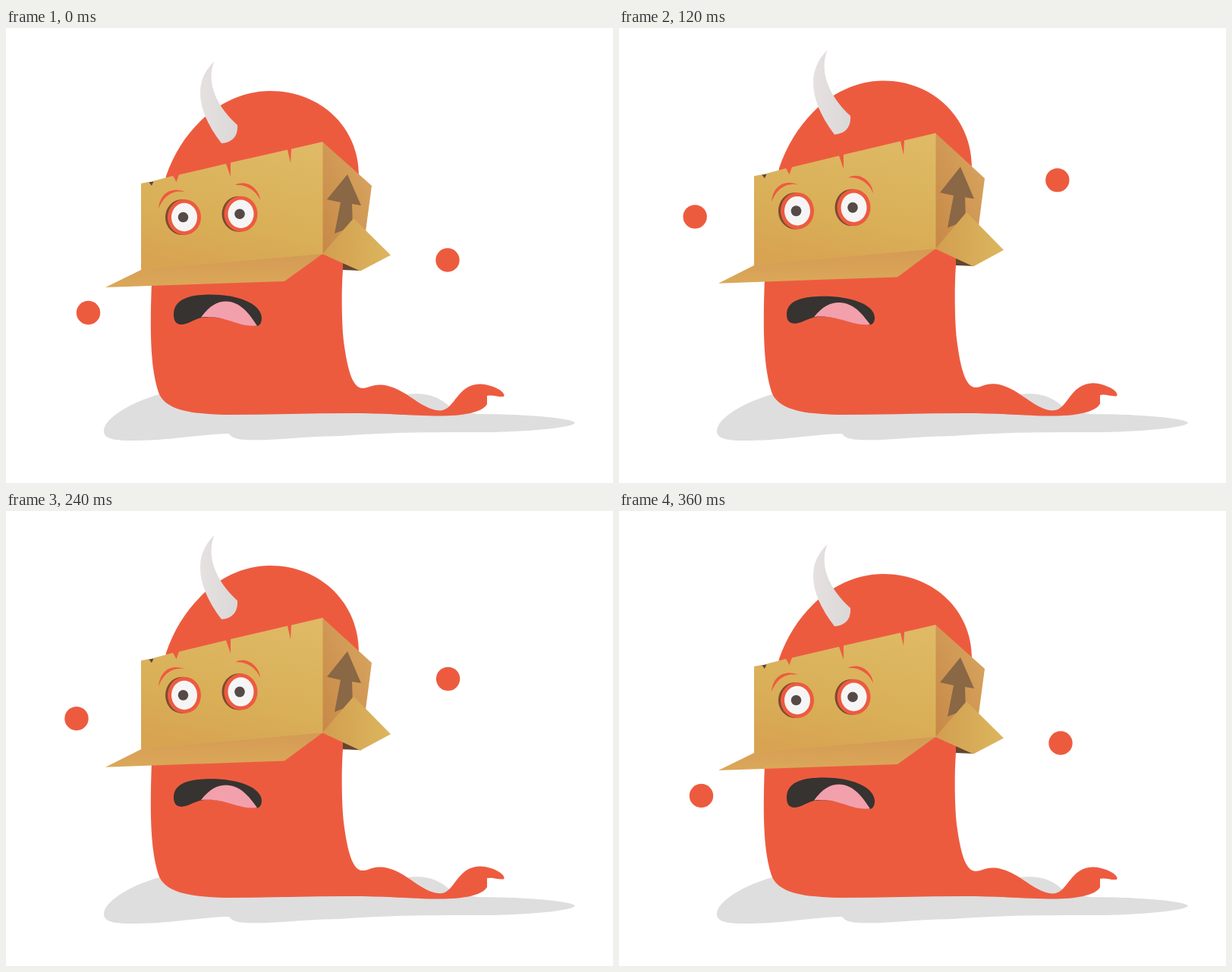
These frames come from a looping animation (800 px wide and 600 px high, 0.4 s). An HTML page:

```html
<!DOCTYPE html>
<html lang="en">
<head>
<meta charset="utf-8">
<title>Jumpy monster in a box</title>
<style>
  html, body { margin: 0; width: 100%; height: 100%; overflow: hidden; background: #fff; }
  svg { display: block; width: 100vw; height: 100vh; }
  .red { fill: #ed5b3f; }
</style>
</head>
<body>
<svg viewBox="0 0 800 600">
  <defs>
    <linearGradient id="front" x1=".7" y1="0" x2=".4" y2="1">
      <stop offset="0" stop-color="#dfb965"/>
      <stop offset=".6" stop-color="#d9b058"/>
      <stop offset="1" stop-color="#d8a452"/>
    </linearGradient>
    <linearGradient id="brim" x1="0" y1="0" x2="0" y2="1">
      <stop offset="0" stop-color="#d49a55"/>
      <stop offset="1" stop-color="#dba858"/>
    </linearGradient>
    <linearGradient id="side" x1="1" y1="0" x2="0" y2="1">
      <stop offset="0" stop-color="#d9a862"/>
      <stop offset="1" stop-color="#c78846"/>
    </linearGradient>
    <linearGradient id="flap">
      <stop offset="0" stop-color="#d29e50"/>
      <stop offset="1" stop-color="#dcb65e"/>
    </linearGradient>
    <linearGradient id="ivory">
      <stop offset="0" stop-color="#e6e1e0"/>
      <stop offset="1" stop-color="#dad8d7"/>
    </linearGradient>
    <g id="eye">
      <ellipse cx="-1.5" rx="22" ry="23.5" fill="#7d4a30"/>
      <ellipse class="red" cx="1.5" rx="22" ry="23.5"/>
      <ellipse cx="1.5" rx="17" ry="18.7" fill="#f6f5f6"/>
      <circle r="6.8" fill="#574a46"/>
    </g>
  </defs>

  <path fill="#dedede" d="M205 482C160 495 131 515 129 530C128 543 142 546 200 543C240 540 270 535 294 535C300 543 310 544 345 543C380 541 415 538 440 538C500 533 560 533 640 533C690 532 748 527 750 520.500C745 514 680 509 620 509L586 500C570 486 555 480 528 483Z"/>

  <g id="monster">
    <path class="red" d="M211 195C233 131 287 83 348 83C417 83 466 134 465 195L444 319C442 345 442 395 446 420C451 455 458 475 470 475C478 475 481 470.500 493 470.500C525 471.500 546 504.500 573 504.500C592 503 594 470 625 469.500C641 470 660 480 656 486C648 487 640 483 634 485L634 496C628 507 602 511.500 572 511.500C540 511.500 505 508 455 508C400 508 345 510 290 510C238 509 211 502 202 483C189 448 190 390 192 335Z"/>
    <path fill="url(#ivory)" d="M274.500 44C247 70 250 108 284 152C298 151 306 143 305 128C275 101 264 70 274.500 44Z"/>

    <path fill="#65452f" d="M187.500 203.500L195.500 202L192 209ZM444 300V319L468 320Z"/>
    <path fill="url(#side)" d="M417 150L482 208L474 268L417 298Z"/>
    <path fill="#8a6745" d="M450 193L468 234L456 232L457 262L433 271L441 230L423 226Z"/>
    <path fill="url(#flap)" d="M458 251L507 299.500L467 320.500L417 298Z"/>
    <path fill="url(#front)" d="M178 205L188 203L192 208L195 201.500L220 195L224.500 203L228 193.500L290 179L296 196V177.500L371 160.500L375 178L376 159.500L417.500 150V298.500L178 319.500Z"/>
    <path fill="url(#brim)" d="M178 319L417 298L367 334L131 342Z"/>

    <use href="#eye" x="233.500" y="249.500"/>
    <use href="#eye" x="308" y="245.200"/>
    <path class="red" d="M201 238C203 217 219 209 236 216C220 213 208 221 201 238ZM302 207C317 199 334 212 335 227C329 213 316 206 302 207Z"/>
  </g>

  <g id="mouth">
    <path fill="#363330" d="M221 378C221 359 239 351.500 270 351.500C305 351.500 336 363 337 382C337 388 335 392 331 393C305 390 282 378 257 382C246 385 240 391 231 391C224 391 221 386 221 378Z"/>
    <path fill="#f3a0ad" d="M257 381.500C268 366 279 360.500 290 360.500C309 361 320 376 331 392.500C305 395 290 378 257 381.500Z"/>
  </g>

  <circle id="leftHand" class="red" r="15.700"/>
  <circle id="rightHand" class="red" r="15.700"/>
</svg>
<script>
  const STEP = 40, STEPS = 10, PEAK = 4;
  const el = id => document.getElementById(id);
  const cubic = ([a, b, c, d], p) => a + p * (b + p * (c + p * d));

  const stretch = (id, baseY, scale) =>
    el(id).setAttribute('transform', `translate(0 ${baseY}) scale(1 ${scale}) translate(0 ${-baseY})`);

  const place = (id, x, y, p) =>
    el(id).setAttribute('transform', `translate(${cubic(x, p)} ${cubic(y, p)})`);

  // Linear rise to the peak, then a slightly slower fall and a one-step rest.
  function draw(now) {
    const k = Math.floor(now / STEP) % STEPS;
    const p = k <= PEAK ? k / PEAK : (STEPS - 1 - k) / (STEPS - 1 - PEAK);
    stretch('monster', 510, 1 + 0.0425 * p);
    stretch('mouth', 376, 1 - 0.12 * p);
    place('leftHand', [108.5, -71.5, 58, 30], [375.5, -150.5, -62, 50], p);
    place('rightHand', [582, 20.5, -23.5, -15], [306, -135.5, -19.5, 17], p);
  }

  function loop() {
    draw(performance.now());
    requestAnimationFrame(loop);
  }
  loop();
</script>
</body>
</html>
```
